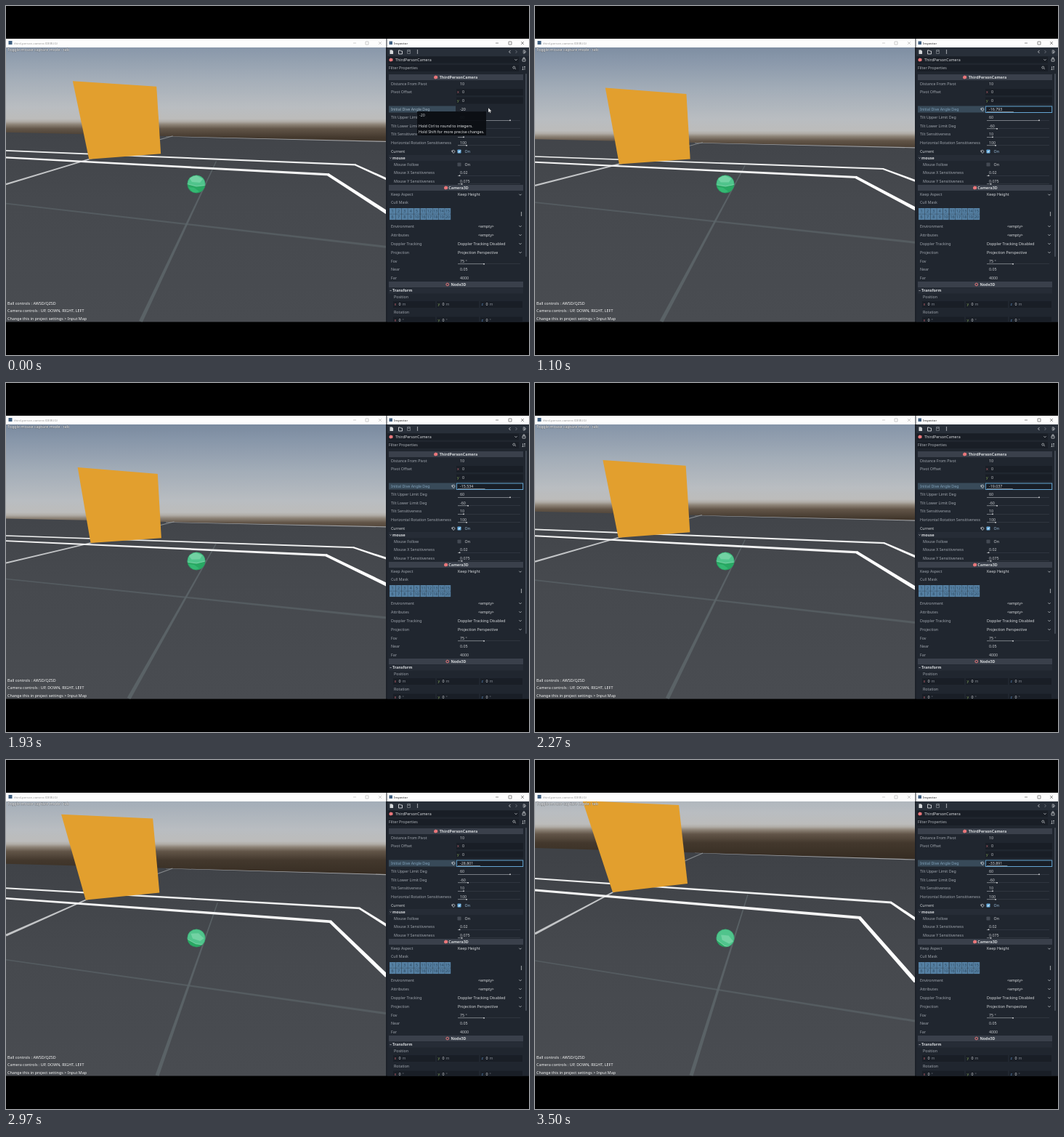
Animation, 720 px wide and 480 px high, one loop 3.53 s. Source, as an HTML page:

```html
<!DOCTYPE html>
<html lang="en">
<head>
<meta charset="utf-8">
<title>Third person camera</title>
<style>
  html, body { margin: 0; width: 100%; height: 100%; overflow: hidden; background: #000; }
  svg { display: block; width: 100%; height: 100%; }
  text { font-family: "Noto Sans", "Open Sans", sans-serif; font-size: 5.3px; white-space: pre; }
  .hud { fill: #fff; font-size: 5.4px; paint-order: stroke; stroke: #3a3e43; stroke-width: .35px; }
  .bar { font-size: 4.3px; }
</style>
</head>
<body>
<svg id="stage" viewBox="0 0 720 480" xmlns="http://www.w3.org/2000/svg">
  <defs>
    <linearGradient id="sky" gradientUnits="userSpaceOnUse" x1="0" y1="0" x2="0" y2="180">
      <stop offset="0" stop-color="#718298"/><stop offset=".2" stop-color="#8796a9"/>
      <stop offset=".444" stop-color="#a3adb8"/><stop offset=".667" stop-color="#b9bdc1"/>
      <stop offset=".756" stop-color="#bcbcbb"/><stop offset=".778" stop-color="#b0aca6"/>
      <stop offset=".8" stop-color="#8d8377"/><stop offset=".833" stop-color="#625548"/>
      <stop offset=".9" stop-color="#43382d"/><stop offset="1" stop-color="#382e24"/>
    </linearGradient>
    <linearGradient id="ground" gradientUnits="userSpaceOnUse" x1="0" y1="130" x2="0" y2="434">
      <stop offset="0" stop-color="#3f4247"/><stop offset=".45" stop-color="#46494e"/><stop offset="1" stop-color="#494c51"/>
    </linearGradient>
    <clipPath id="view"><rect y="57" width="523" height="377.5"/></clipPath>
    <clipPath id="panelClip"><rect x="523" y="45" width="197" height="389.5"/></clipPath>
    <clipPath id="ballClip"><circle cx="262" cy="245" r="12.3"/></clipPath>
  </defs>
  <rect width="720" height="480"/>
  <g id="scene" clip-path="url(#view)"></g>
  <g id="panel" clip-path="url(#panelClip)"></g>
  <g id="bars"></g>
</svg>
<script>
const NS = 'http://www.w3.org/2000/svg';
const LOOP = 3530;
const $ = id => document.getElementById(id);
let layer;

function el(tag, attrs) {
  const e = document.createElementNS(NS, tag);
  for (const k in attrs) e.setAttribute(k, attrs[k]);
  return layer.appendChild(e);
}
const rect = (x, y, width, height, fill, more) => el('rect', { x, y, width, height, fill, ...more });
const path = (d, stroke, w = .7, more) => el('path', { d, stroke, 'stroke-width': w, fill: 'none', ...more });
const poly = (fill, opacity = 1) => el('polygon', { fill, opacity });
function text(x, y, s, fill = '#b9bdc3', more) {
  const e = el('text', { x, y: y + 1.9, fill, ...more });
  e.textContent = s;
  return e;
}

// ---- 3D view ----
layer = $('scene');
const sky = rect(0, 0, 523, 300, 'url(#sky)');
const floor = poly('url(#ground)');
const farLine = poly('#b9babb', .8);
const gridA = poly('#616a6e', .75), gridB = poly('#5d666a', .65);
const sideFar = poly('#989b9e', .8), side = poly('#c3c5c7');
const upper = poly('#eff0f0'), upperEnd = poly('#fafafa');
const lower = poly('#f4f4f4'), lowerEnd = poly('#fff');
const board = poly('#e29f2e');

const ball = el('g', { 'clip-path': 'url(#ballClip)' });
layer = ball;
rect(249, 232, 26, 26, '#28a863');
const cap = el('g', {});
layer = cap;
el('path', { d: 'M244 225H280V246L262 248 244 243Z', fill: '#50c48c' });
el('path', { d: 'M252 236L262 233 271 238 267 243 256 242Z', fill: '#72d2a3' });
path('M247 244L262 248 279 246', '#a5e2c4', .8, { opacity: .7 });
layer = ball;
const glint = el('path', { d: 'M251 249L259 250 266 255 258 258Z', fill: '#34b872' });
layer = $('scene');
el('circle', { cx: 262, cy: 245, r: 12.2, fill: 'none', stroke: '#2c9460', 'stroke-width': .4 });

const hud = (y, s) => text(2, y, s, '#fff', { class: 'hud' });
hud(60, 'Toggle mouse capture mode : tab');
hud(409, 'Ball controls : AWSD/QZSD');
hud(419.5, 'Camera controls : UP, DOWN, RIGHT, LEFT');
hud(430, 'Change this in project settings > Input Map');

// ---- window bars ----
layer = $('bars');
function titleBar(x, w, name, tx, ink, at) {
  rect(x, 45, w, 12, '#fdfdfd');
  text(tx, 50.8, name, ink, { class: 'bar' });
  const [a, b, c] = at;
  path(`M${a - 2} 51h4M${b - 2} 49h4v4h-4zM${c - 2} 49l4 4m0-4l-4 4`, ink, .5);
}
titleBar(0, 523.5, 'third-person-camera (DEBUG)', 11, '#9a9a9a', [480, 497, 515]);
titleBar(524.5, 195.5, 'Inspector', 534, '#222', [676, 694, 711]);
rect(3.5, 48, 5, 5, '#3f5f80');
rect(527.5, 48.5, 4.5, 4.5, '#3f5f80');

// ---- inspector ----
layer = $('panel');
rect(523, 45, 197, 390, '#1c2129');
rect(525, 57, 195, 378, '#20262f');
rect(525, 57, 195, 12, '#282f39');

const BRIGHT = '#d6d9dc', DIM = '#9fa5ad', DARK = '#191e26';
const caret = (x, y, s = 1.6) => path(`M${x - s} ${y - s / 2}l${s} ${s}l${s} ${-s}`, '#c4c8cc', .8);
const node = (x, y) => el('path', { d: `M${x - 2.5} ${y - 1}l2-1.5 3 1v3l-3 1-2-1z`, fill: '#e8767a' });
const undo = (x, y) => path(`M${x - 1.6} ${y - 1.4}v1.8h1.8M${x - 1.4} ${y}a1.9 1.9 0 1 1 .6 1.6`, '#d9dcdf', .7);
const dots = (x, y) => [-2, 0, 2].forEach(d => el('circle', { cx: x, cy: y + d, r: .7, fill: BRIGHT }));

path('M528.5 60.5h3l1.5 1.5v4h-4.5z', BRIGHT, .1, { fill: BRIGHT });
path('M540.5 61h2l1 1h2v4h-5z', BRIGHT, .9);
path('M552.5 60.5h4v5h-4zM553.5 61v1.5h2v-1.5', '#70767e', .9);
dots(566.5, 63);
path('M694.5 61l-2 2 2 2', BRIGHT, .8);
path('M701.5 61l2 2-2 2', '#777d86', .8);
path('M711.5 62a2 2 0 1 1 0 2M713 62v1.5h1', BRIGHT, .8);
rect(526, 69.5, 180, 9, DARK);
node(530, 74);
text(536, 74, 'ThirdPersonCamera', BRIGHT);
caret(702, 74);
path('M711 76v-3h4v3zM712 73v-2h2v2', BRIGHT, .7);
rect(526, 81, 180, 9, DARK);
text(527, 85.5, 'Filter Properties', '#aeb3b9');
path('M702 87l-1.5-1.5a1.5 1.5 0 1 0-.3.3', BRIGHT, .7);
path('M711.5 83v5m-1-1l1 1 1-1M714 88v-5m-1 1l1-1 1 1', BRIGHT, .6);

function category(y, s, ring) {
  rect(527, y - 4, 185, 8, '#3a404b');
  text(623, y, s, BRIGHT, { 'text-anchor': 'middle', 'font-weight': 600 });
  const x = 623 - s.length * 1.55 - 5;
  if (ring) el('circle', { cx: x - 1, cy: y, r: 1.8, fill: 'none', stroke: '#e8767a', 'stroke-width': 1 });
  else node(x, y);
}
function slider(y, to) {
  rect(622, y + 3.5, 86, .5, '#3f454e');
  rect(622, y + 3.5, to - 622, .6, '#a9adb2');
  rect(to - .7, y + 3, 1.5, 1.6, '#e0e2e4');
}
function row(y, name, value, to, x = 530) {
  text(x, y, name, DIM);
  text(625, y, value, '#c8cbcf');
  if (to) slider(y, to);
}
function choice(y, name, value, x = 622) {
  text(530, y, name, DIM);
  text(x, y, value, BRIGHT);
  caret(708, y);
}
function check(y, on) {
  rect(621.5, y - 2.5, 5, 5, on ? '#68aee0' : '#444a54', { rx: .8 });
  if (on) path(`M622.8 ${y}l1 1.2 1.8-2.5`, '#fff', .8);
  text(631.5, y, 'On', on ? '#9fc4e2' : BRIGHT);
}
function section(y, s) {
  rect(527, y - 4, 185, 8, '#262c36');
  caret(529.5, y, 1);
  text(532, y, s, BRIGHT, { 'font-weight': 600 });
}

category(98, 'ThirdPersonCamera');
row(107, 'Distance From Pivot', '10');
text(530, 118.5, 'Pivot Offset', DIM);
[['x', 118.5, '#b7616c'], ['y', 130, '#82a25a']].forEach(([s, y, c]) => {
  rect(620, y - 4.5, 92, 9, DARK);
  text(621, y, s, c);
  text(628, y, '0', '#c8cbcf');
});
row(153.5, 'Tilt Upper Limit Deg', '60', 694);
row(165, 'Tilt Lower Limit Deg', '-60', 636);
row(176.5, 'Tilt Sensitiveness', '10', 630);
row(188, 'Horizontal Rotation Sensitiveness', '100', 634);
text(530, 200, 'Current', BRIGHT);
undo(615.5, 200);
check(200, true);
section(209, 'mouse');
row(218, 'Mouse Follow', '', 0, 534);
check(218, false);
row(229.5, 'Mouse X Sensitiveness', '0.02', 624.5, 534);
row(241, 'Mouse Y Sensitiveness', '0.075', 627.5, 534);
category(250, 'Camera3D');
choice(259.5, 'Keep Aspect', 'Keep Height');
text(530, 270.5, 'Cull Mask', DIM);
for (let i = 0; i < 20; i++) {
  const c = i % 5, right = Math.floor(i / 5) % 2, low = i > 9;
  const x = 528 + c * 8.4 + right * 42.5, y = low ? 286.2 : 278;
  rect(x, y, 8.1, 7.9, '#5580a3');
  text(x + 4, y + 4, c + 1 + (low ? 5 : 0) + right * 10, '#2b455d', { 'text-anchor': 'middle' });
}
dots(709.5, 286);
choice(303, 'Environment', '<empty>', 650);
choice(315, 'Attributes', '<empty>', 650);
choice(327, 'Doppler Tracking', 'Doppler Tracking Disabled');
choice(339, 'Projection', 'Projection Perspective');
row(351, 'Fov', '75 °', 658);
row(362.5, 'Near', '0.05');
row(374, 'Far', '4000');
category(383, 'Node3D', true);
section(391.5, 'Transform');
function vector(y, name, unit) {
  text(534, y - 10.5, name, DIM);
  ['x', 'y', 'z'].forEach((s, i) => {
    const x = 533 + i * 60;
    rect(x, y - 4.5, 58, 9, DARK);
    text(x + 1.5, y, s, ['#b7616c', '#82a25a', '#5a86b8'][i]);
    text(x + 7.5, y, '0', BRIGHT);
    text(x + 12.5, y, unit, '#7d838b');
  });
}
vector(410.5, 'Position', 'm');
vector(432, 'Rotation', '°');
rect(715, 93, 2, 252, '#434a55', { rx: 1 });

// the edited property
rect(527, 137.5, 92, 9, '#384a59');
const rowName = text(530, 142, 'Initial Dive Angle Deg', '#86a8c0');
const focusBox = rect(620.4, 138, 91.3, 8.5, DARK, { stroke: '#64a5d2', 'stroke-width': 1 });
const reset = undo(615.5, 142);
const value = text(625, 142, '', BRIGHT);
const fill = rect(622, 145.4, 30, .6, '#b4b8bc');

const tip = el('g', {});
layer = tip;
rect(566, 145, 95, 33, '#0b0e13', { opacity: .95 });
text(569, 150, '-20', '#c9ccd0');
text(568, 165.5, 'Hold Ctrl to round to integers.', '#e2e4e6');
text(568, 173, 'Hold Shift for more precise changes.', '#e2e4e6');
layer = $('panel');
const pointer = el('path', { d: 'M664 140v6.5l1.5-1.4 1 2.2 1-.5-1-2h2z', fill: '#fff', stroke: '#222', 'stroke-width': .3 });

// ---- motion ----
const KEYS = [
  [0, 20], [640, 20], [800, 19.243], [1100, 16.8], [1400, 14.568], [1530, 14], [1730, 14],
  [1850, 14.7], [2270, 19.022], [2570, 23.492], [2970, 28.791], [3500, 33.891], [LOOP, 33.891]
];
function angleAt(t) {
  const i = Math.max(1, KEYS.findIndex(k => k[0] >= t));
  const [t0, a] = KEYS[i - 1], [t1, b] = KEYS[i];
  return a + (b - a) * (t - t0) / (t1 - t0);
}

const shape = (e, ...list) => e.setAttribute('points', list.map(p => p.join(',')).join(' '));
function taper(e, p, w, q, v) {
  const dx = q[0] - p[0], dy = q[1] - p[1], l = Math.hypot(dx, dy) * 2;
  const nx = -dy / l, ny = dx / l;
  shape(e, [p[0] + nx * w, p[1] + ny * w], [q[0] + nx * v, q[1] + ny * v],
    [q[0] - nx * v, q[1] - ny * v], [p[0] - nx * w, p[1] - ny * w]);
}

function draw(t) {
  const a = angleAt(t);
  // quadratic through the poses at three tilts
  const A = 14.568, B = 23.492, C = 33.891;
  const wa = (a - B) * (a - C) / ((A - B) * (A - C));
  const wb = (a - A) * (a - C) / ((B - A) * (B - C));
  const wc = 1 - wa - wb;
  const q = (x, y, z) => x * wa + y * wb + z * wc;
  const pt = (x0, x1, x2, y0, y1, y2) => [q(x0, x1, x2), q(y0, y1, y2)];
  const near = (a - A) / (C - A);

  sky.setAttribute('transform', `translate(0 ${q(187, 141.5, 92) - 140})`);
  const left = [0, q(189, 162.5, 121)], right = [523, q(199.5, 175.5, 136.5)];
  shape(floor, left, right, [523, 435], [0, 435]);
  taper(farLine, [220, left[1] + (right[1] - left[1]) * .42 + .4], .4, [523, right[1] + .5], 1.2);

  const corner = pt(117, 112.5, 107, 222, 203.5, 182);
  taper(sideFar, pt(232, 229, 231, 193, 168, 128), .9, corner, 1.8);
  taper(side, corner, 1.7, [0, q(248, 243.5, 239)], 2.1 + near);

  taper(gridA, pt(289, 290, 293, 223, 207, 185), 1.2, pt(165, 196, 215, 434, 434, 434), 5.2);
  taper(gridB, [0, q(269, 273, 276)], 1.6, [523, q(321, 338, 359)], 3);

  const u = pt(478, 483, 490, 228, 212.5, 196);
  taper(upper, [0, q(212.5, 190, 163)], 1.5 + near * .7, [u[0] + .8, u[1]], 1.9 + near);
  taper(upperEnd, u, 2 + near, [524, q(242, 234.5, 219)], 2.8 + near);
  const l = pt(440, 445, 447, 238, 228, 217);
  taper(lower, [0, q(219, 201.3, 179)], 1.8 + near, [l[0] + 1.5, l[1]], 3 + near);
  taper(lowerEnd, l, 3.5 + near, [524, q(276, 289, 304.5)], 4.6 + near);

  shape(board, pt(100, 86, 65.5, 118.5, 92.5, 56), pt(209, 205.5, 198, 128, 99, 62),
    pt(214, 212.5, 210, 215.5, 195, 170), corner);

  const roll = Math.max(0, a - 20);
  cap.setAttribute('transform', `translate(0 ${roll * .55}) rotate(${(a - 20) * 1.6} 262 245)`);
  glint.setAttribute('opacity', Math.max(0, 1 - roll / 6));

  const editing = t >= 560;
  const show = (e, on) => e.setAttribute('visibility', on ? 'visible' : 'hidden');
  show(tip, !editing);
  show(pointer, !editing);
  show(focusBox, editing);
  show(reset, a !== 20);
  rowName.setAttribute('fill', editing ? '#7fa0b9' : '#a2b6c4');
  value.textContent = a === 20 ? '-20' : (-a).toFixed(3);
  fill.setAttribute('width', 38 - (a - A) * .5);
}

const start = performance.now();
function tick() {
  draw((performance.now() - start) % LOOP);
  requestAnimationFrame(tick);
}
draw(0);
requestAnimationFrame(tick);
</script>
</body>
</html>
```
